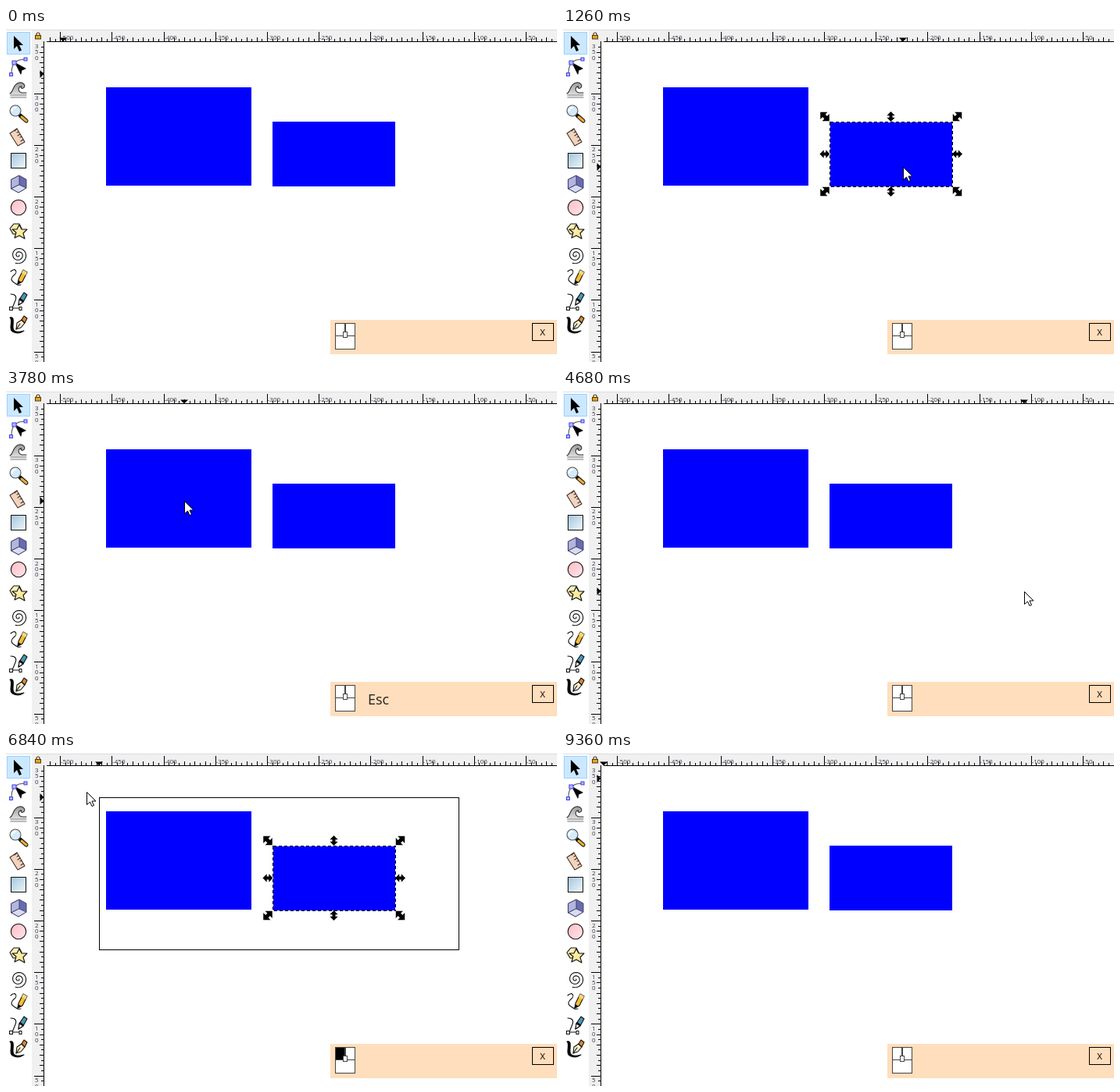
These frames come from a looping animation (705 px wide and 428 px high, 9900 ms). An HTML page:

```html
<!DOCTYPE html>
<html lang="en">
<head>
<meta charset="utf-8">
<style>
html, body { margin: 0; width: 100%; height: 100%; overflow: hidden; background: #fff; }
svg { display: block; width: 705px; height: 428px; font-family: "Open Sans", "Noto Sans", sans-serif; }
.crisp { shape-rendering: crispEdges; }
.label { font-size: 8px; fill: #34344c; }
#tools { fill: none; stroke: #111; stroke-width: 1.1; stroke-linejoin: round; stroke-linecap: round; }
</style>
</head>
<body>
<svg viewBox="0 0 705 428" xmlns="http://www.w3.org/2000/svg">
  <defs>
    <linearGradient id="sky" x2="1" y2="1"><stop stop-color="#a3c4dc"/><stop offset="1" stop-color="#f0f8fc"/></linearGradient>
    <linearGradient id="pink" x2="1" y2="1"><stop stop-color="#ffbcc6"/><stop offset="1" stop-color="#ffe6ea"/></linearGradient>
    <linearGradient id="gold" x2="1" y2="1"><stop stop-color="#fffbd8"/><stop offset="1" stop-color="#f6dc70"/></linearGradient>
    <linearGradient id="wave" x2="0" y2="1"><stop stop-color="#999"/><stop offset="1" stop-color="#f4f4f4"/></linearGradient>
    <path id="arrow" d="M0-6.5 5.2-1.3H2V1.3H5.2L0 6.5-5.2 1.3H-2V-1.3H-5.2Z"/>
  </defs>
  <rect width="705" height="428" fill="#fff"/>

  <g class="crisp">
    <path d="M33 3H705V17H48V428H33Z" fill="#f0f0f0"/>
    <path d="M0 2.5H705" stroke="#dcdcdc"/>
    <path d="M52 17.5H705M48.5 17V428" stroke="#000"/>
    <path id="ticks" stroke="#000" fill="none"/>
  </g>
  <g id="labels" class="label"></g>
  <path id="markX" d="M-5-4H5L0 1Z"/>
  <path id="markY" d="M-4-5V5L1 0Z"/>
  <path d="M39 10V8a2 2 0 0 1 4 0V10" fill="none" stroke="#4d3b12" stroke-width="1.2"/>
  <rect x="37.500" y="9.500" width="7" height="4.500" fill="#e8a51c" stroke="#4d3b12"/>

  <rect class="crisp" x="1.500" y="5.500" width="29" height="28" fill="#cce8ff" stroke="#99d1ff"/>
  <g id="tools">
    <path transform="translate(16 20)" fill="#000" stroke="none" d="M-6-10V7L-2 3 1 10 4 8.500 1 2H6Z"/>
    <g transform="translate(16 50)">
      <path d="M-9 9C-9 0-7-6 1-9L9-10" stroke="#555"/>
      <path d="M-4-5 9 2 4 4 3 9Z" fill="#000"/>
      <path d="M-11.500 7.500h4v4h-4ZM-8-8h5v5h-5ZM7-12h4v4H7Z" fill="#b6b6ff" stroke="#4444e8"/>
    </g>
    <g transform="translate(16 80)">
      <path d="M-11 4C-6 2-8-8 1-10 7-11 10-5 6-3 4-2 2-4 4-5 0-6-2 1 4 3H10V10H-11Z" fill="url(#wave)" stroke="none"/>
      <path d="M-11 4C-6 2-8-8 1-10 7-11 10-5 6-3 4-2 2-4 4-5 0-6-2 1 4 3H10" stroke="#333"/>
      <path d="M-10 6H10M-10 9H10" stroke="#888"/>
    </g>
    <g transform="translate(16 110)">
      <path d="M2 2 10 9" stroke="#111" stroke-width="5"/>
      <path d="M4 4 10 9" stroke="#edaa35" stroke-width="3"/>
      <circle cx="-4" cy="-4" r="7" fill="#d5eafa" stroke="#555"/>
      <path d="M-8-4A4 4 0 0 1-4-8" stroke="#fff" stroke-width="2"/>
    </g>
    <g transform="translate(16 140)">
      <path d="M-11-5-2-11 8 6-1 11Z" fill="#f2d3bd" stroke="#44342c"/>
      <path d="M-2-11-5-8M0-7-2-6M2-4-1-2M4-1 2 0M6 3 3 5" stroke="#44342c"/>
    </g>
    <rect class="crisp" x="6.500" y="160.500" width="19" height="19" fill="url(#sky)"/>
    <g transform="translate(16 200)" stroke="#3a3a66" stroke-width=".9">
      <path d="M-9-6 1-11 10-6V5L0 11-9 6Z" fill="#686cae"/>
      <path d="M-9-6 1-11V1L-9 6Z" fill="#b2b6de"/>
      <path d="M1 1 10 5 0 11-9 6Z" fill="#d8dcf0"/>
    </g>
    <circle cx="16" cy="230" r="9.700" fill="url(#pink)"/>
    <g transform="translate(16 260)" fill="url(#gold)">
      <path d="M-11-3-6-9H1L4-3 0 4H-7Z"/>
      <path d="M1-8 4-2 11-2 6 3 8 10 1 6-5 9-3 2-8-2H-2Z"/>
    </g>
    <path id="spiral"/>
    <g transform="translate(16 320)">
      <path d="M-10-8C-4-14-1-7-5-4S-11 3-6 6-2 10 3 9"/>
      <path d="M-1 8 0 2 6-10 11-7 5 5Z" fill="#f4bd36"/>
      <path d="M6-10 11-7 9-3 4-6Z" fill="#f6d97b" stroke="none"/>
      <path d="M-1 8 0 4 3 6Z" fill="#000"/>
    </g>
    <g transform="translate(16 350)">
      <path d="M-10-9C-4-9-2-6-4-1L-8 9H2"/>
      <path d="M-11.500 7.500h4v4h-4ZM1 7.500h3v4H1Z" fill="#fff"/>
      <path d="M0 5 1-2 7-11 11-8 6 1Z" fill="#4698b5"/>
      <path d="M0 5 1-2 6 1Z" fill="#eee"/>
      <path d="M2-3 6 0" stroke-width="2"/>
    </g>
    <g transform="translate(16 380)">
      <path d="M-11-9C-5-11-7-3-7 3S-3 11 7 8C0 13-10 11-10 4-10-2-8-7-11-9Z" fill="#000"/>
      <path d="M-3 6-2-2 4-6 8-2 3 4Z" fill="#fff1cf"/>
      <path d="M4-6 7-11 11-8 8-2Z" fill="#dd8a2f"/>
      <path d="M-3 6 2-1"/>
    </g>
  </g>

  <g class="crisp" fill="#00f">
    <rect x="128" y="76" width="186" height="126"/>
    <rect x="341" y="120" width="157" height="83"/>
  </g>
  <g id="single"></g>
  <g id="both"></g>
  <rect id="band" class="crisp" fill="none" stroke="#000"/>

  <rect x="415" y="374" width="290" height="44" fill="#ffdebd"/>
  <g class="crisp" stroke="#444">
    <rect x="421.500" y="378.500" width="25" height="33" fill="#fff"/>
    <rect id="button" x="421.500" y="378.500" width="12" height="16" fill="#000"/>
    <path d="M421 394.500H447"/>
    <path d="M434 378V390" stroke-width="2"/>
    <rect x="431.500" y="389.500" width="5" height="7" fill="#fff"/>
    <rect x="673.500" y="378.500" width="27" height="22" fill="none" stroke="#000"/>
  </g>
  <text x="686.500" y="394" font-size="11.500" text-anchor="middle">X</text>
  <text id="key" x="463" y="403" font-size="18" fill="#222"></text>
  <path id="pointer" d="M.5 .5V16.500L4.500 13 7 18.500 9.500 17.500 7 12H12Z" fill="#fff" stroke="#000"/>
</svg>
<script>
const LOOP = 9900, STEP = 180, LAG = 72, UNIT = 66.2;
const $ = id => document.getElementById(id);
const show = (id, on) => $(id).setAttribute("display", on ? "inline" : "none");
const move = (id, x, y) => $(id).setAttribute("transform", `translate(${x} ${y})`);
const within = (t, spans) => spans.some(([a, b]) => t >= a && t < b);

// time, x, y of the pointer
const path = [
  [0, 73, 59], [300, 73, 59], [900, 435, 178], [1360, 435, 178], [1720, 228, 142],
  [3800, 228, 142], [4600, 590, 258], [4690, 590, 258], [5320, 325, 100], [5580, 325, 100],
  [5760, 440, 170], [6290, 580, 253], [6380, 580, 253], [6660, 143, 68], [6840, 103, 51],
  [7120, 72, 38], [8990, 72, 38], [9280, 52, 34], [LOOP, 52, 34]
];
const bands = [
  { from: 4860, to: 5760, x: 590, y: 258 },
  { from: 6480, to: 7920, x: 580, y: 253 }
];
const keys = [["Shift", 1440, 3060], ["Esc", 3780, 4500], ["Esc", 9000, 9360]];
const pressed = [[1080, 1260], [2340, 2520], ...bands.map(b => [b.from, b.to])];

function pointerAt(t) {
  const i = Math.max(1, path.findIndex(p => p[0] >= t));
  const [t0, x0, y0] = path[i - 1], [t1, x1, y1] = path[i];
  const k = Math.max(0, (t - t0) / (t1 - t0));
  return [Math.round(x0 + (x1 - x0) * k), Math.round(y0 + (y1 - y0) * k)];
}

function buildRulers() {
  let ticks = "", labels = "";
  for (let i = -10; i < 100; i++) {
    const size = i % 10 === 0 ? 12 : i % 2 === 0 ? 5 : 3;
    const x = Math.round(69.200 + i * UNIT / 10) + .5;
    const y = Math.floor(84 + i * UNIT / 10) + .5;
    if (x > 52) ticks += `M${x} 17v${-size}`;
    if (y > 18 && y < 428) ticks += `M48 ${y}h${-size}`;
  }
  for (let i = 0; i < 10; i++) {
    labels += `<text x="${70 + i * UNIT}" y="14.500">${i * 50 - 500}</text>`;
    [...String(350 - i * 50)].forEach((digit, n) => {
      if (i < 7) labels += `<text x="37" y="${26 + i * UNIT + n * 7.300}">${digit}</text>`;
    });
  }
  $("ticks").setAttribute("d", ticks);
  $("labels").innerHTML = labels;
}

const outline = ([x0, y0, x1, y1]) => {
  const box = `class="crisp" x="${x0 + .5}" y="${y0 + .5}" width="${x1 - x0}" height="${y1 - y0}" fill="none"`;
  return `<rect ${box} stroke="#fff"/><rect ${box} stroke="#000" stroke-dasharray="4 3"/>`;
};

function handles([x0, y0, x1, y1]) {
  const xs = [x0 - 6, (x0 + x1) / 2, x1 + 6.500], ys = [y0 - 6.500, (y0 + y1) / 2, y1 + 6.500];
  let out = "";
  for (let r = 0; r < 3; r++) for (let c = 0; c < 3; c++) {
    if (r === 1 && c === 1) continue;
    const turn = r === 1 ? 90 : c === 1 ? 0 : r === c ? -45 : 45;
    const scale = turn % 90 ? 1.250 : 1;
    out += `<use href="#arrow" transform="translate(${xs[c]} ${ys[r]}) rotate(${turn}) scale(${scale})"/>`;
  }
  return out;
}

function buildSpiral() {
  let d = "";
  for (let a = 0; a <= 14.500; a += .25) {
    const r = .8 + a * .7;
    d += `${a ? "L" : "M"}${(16 + r * Math.cos(a)).toFixed(1)} ${(291 + r * Math.sin(a)).toFixed(1)}`;
  }
  $("spiral").setAttribute("d", d);
}

function render(time) {
  const t = Math.floor(time % LOOP / STEP) * STEP;
  const [x, y] = pointerAt(t), [mx, my] = pointerAt(Math.max(0, t - LAG));
  move("pointer", x, y);
  show("pointer", t >= 360 && t < 9360);
  move("markX", mx, 16.500);
  move("markY", 47.500, my);
  show("single", within(t, [[1260, 2520], [5760, 7920]]));
  show("both", within(t, [[2520, 3780], [7920, 9000]]));
  show("button", within(t, pressed));
  const key = keys.find(([, from, to]) => t >= from && t < to);
  $("key").textContent = key ? key[0] : "";
  const band = bands.find(b => t >= b.from && t < b.to);
  show("band", band);
  if (band) {
    const box = { x: mx + .5, y: my + .5, width: Math.max(0, band.x - mx - 1), height: Math.max(0, band.y - my) };
    for (const name in box) $("band").setAttribute(name, box[name]);
  }
}

const large = [128, 76, 314, 202], small = [341, 120, 498, 203];
buildRulers();
buildSpiral();
$("single").innerHTML = outline(small) + handles(small);
$("both").innerHTML = outline(large) + outline(small) + handles([128, 76, 498, 203]);

const start = performance.now();
function tick() {
  render(performance.now() - start);
  requestAnimationFrame(tick);
}
tick();
</script>
</body>
</html>
```
